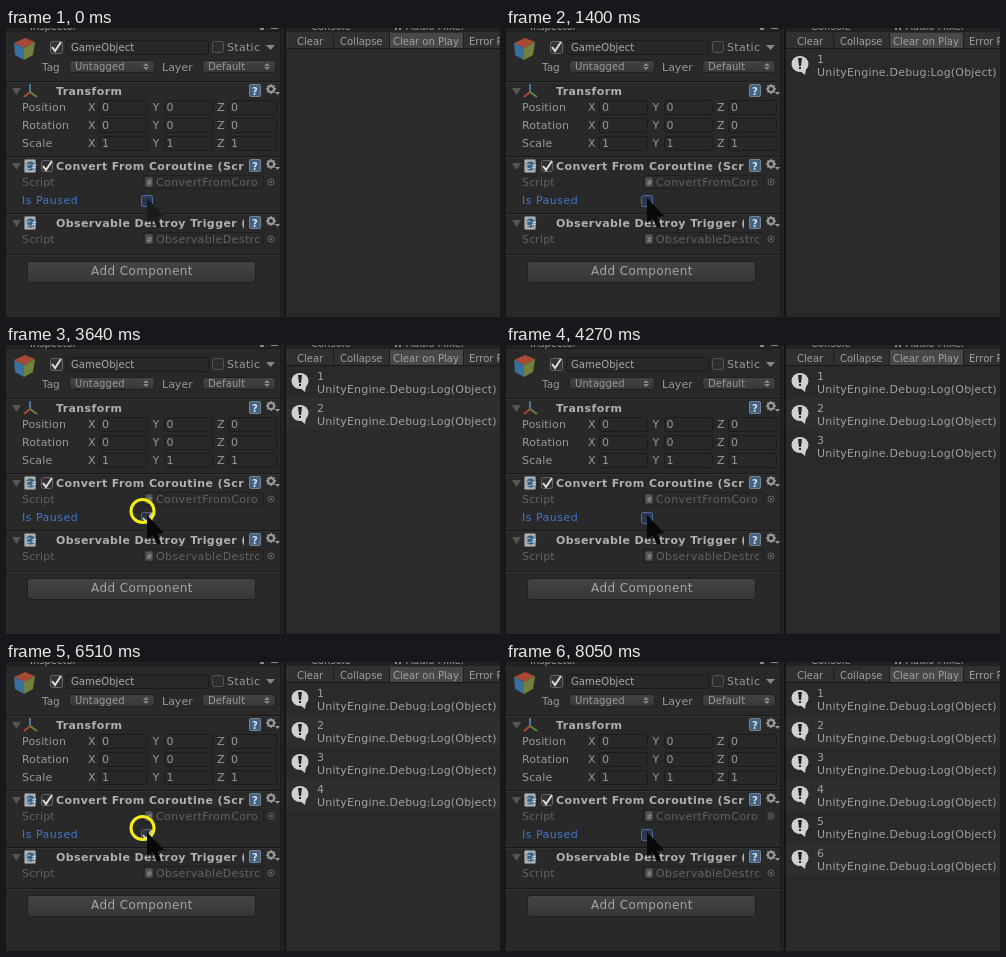
An HTML page with a canvas for the animation above (8.12 s loop, 494x289 px).

```html
<!DOCTYPE html>
<html>
<head>
<meta charset="utf-8">
<style>
html, body { margin: 0; width: 494px; height: 289px; overflow: hidden; background: #292929; }
canvas { display: block; }
</style>
</head>
<body>
<canvas id="stage" width="494" height="289"></canvas>
<script>
const c = document.getElementById('stage').getContext('2d');
const LOOP = 8120;
const LOGS = [840, 1750, 3920, 4900, 6860, 7840];
const CLICKS = [2450, 3640, 5250, 6510];
const RING_TIME = 210, PRESS_TIME = 70;
const FONT = '"DejaVu Sans", Verdana, sans-serif';

function rect(x, y, w, h, fill) {
  c.fillStyle = fill;
  c.fillRect(x, y, w, h);
}

function box(x, y, w, h, fill, stroke, r = 2) {
  c.beginPath();
  c.roundRect(x + .5, y + .5, w - 1, h - 1, r);
  c.fillStyle = fill;
  c.fill();
  c.strokeStyle = stroke;
  c.lineWidth = 1;
  c.stroke();
}

function button(x, y, w, h) {
  const g = c.createLinearGradient(0, y, 0, y + h);
  g.addColorStop(0, '#444');
  g.addColorStop(1, '#363636');
  box(x, y, w, h, g, '#1f1f1f', 3);
}

function text(s, x, y, { color = '#999', size = 11, gap = .15, bold = false, max = 0 } = {}) {
  c.save();
  if (max) {
    c.beginPath();
    c.rect(x, y - 14, max - x, 20);
    c.clip();
  }
  c.font = `${bold ? 'bold ' : ''}${size}px ${FONT}`;
  c.letterSpacing = gap + 'px';
  c.fillStyle = color;
  c.fillText(s, x, y);
  c.restore();
}

function poly(points, fill) {
  c.beginPath();
  points.forEach(([x, y]) => c.lineTo(x, y));
  c.closePath();
  c.fillStyle = fill;
  c.fill();
}

function line(points, color, width = 1) {
  c.beginPath();
  points.forEach(([x, y]) => c.lineTo(x, y));
  c.strokeStyle = color;
  c.lineWidth = width;
  c.stroke();
}

function circle(x, y, r, color, width) {
  c.beginPath();
  c.arc(x, y, r, 0, 7);
  c.lineWidth = width;
  c.strokeStyle = color;
  c.stroke();
}

function check(x, y, color) {
  line([[x + 2, y + 5], [x + 5, y + 9], [x + 11, y]], color, 2);
}

function gear(x, y) {
  circle(x, y, 3, '#999', 2);
  for (let i = 0; i < 8; i++) {
    const a = i * Math.PI / 4, dx = Math.cos(a), dy = Math.sin(a);
    line([[x + dx * 3, y + dy * 3], [x + dx * 5, y + dy * 5]], '#999', 1.5);
  }
  poly([[x + 4, y + 3], [x + 9, y + 3], [x + 6.5, y + 6]], '#999');
}

function help(x, y) {
  box(x, y, 12, 13, '#3f6285', '#77858f', 1);
  text('?', x + 3, y + 10.5, { color: '#ddd', size: 10, bold: true, gap: 0 });
}

function heading(title, y) {
  poly([[6, y - 3], [15, y - 3], [10.5, y + 4]], '#555');
  text(title, 50, y + 4, { color: '#b0b0b0', bold: true, gap: .4, max: 238 });
  help(243, y - 7);
  gear(265, y - 2);
}

function scriptIcon(x, y) {
  box(x, y, 12, 14, '#aab2b6', '#777', 1);
  c.fillStyle = '#376285';
  c.beginPath();
  c.arc(x + 6.5, y + 7, 4.5, 0, 7);
  c.fill();
  text('C#', x + 2, y + 9.5, { color: '#eee', size: 7, gap: 0 });
}

function scriptRow(name, y) {
  text('Script', 16, y + 4, { color: '#626262' });
  box(137, y - 7, 121, 14, '#292929', '#202020');
  box(139, y - 5, 8, 10, '#555', '#444', 1);
  text('#', 140.5, y + 3, { color: '#999', size: 7, gap: 0 });
  text(name, 150, y + 4, { color: '#626262', gap: .4, max: 253 });
  circle(265, y, 3, '#666', 1);
  rect(264, y - 1, 2, 2, '#666');
}

function popup(label, x, w) {
  button(x, 32, w, 13);
  text(label, x + 6, 42, { size: 10, gap: .1 });
  const mid = x + w - 9;
  poly([[mid - 3, 38], [mid + 3, 38], [mid, 35]], '#888');
  poly([[mid - 3, 39], [mid + 3, 39], [mid, 42]], '#888');
}

function header() {
  rect(0, 0, 274, 4, '#222');
  rect(0, 3, 274, 1, '#1c1c1c');
  text('Inspector', 24, 1.5, { size: 10, gap: 0 });
  rect(254, 0, 4, 2, '#888');
  rect(265, 0, 7, 1, '#888');

  poly([[8, 15], [19, 10], [29, 14], [18, 20]], '#a84a35');
  poly([[8, 15], [18, 20], [18, 32], [9, 27]], '#38719f');
  poly([[18, 20], [29, 14], [27, 27], [18, 32]], '#71813b');

  box(44, 13, 13, 13, '#333', '#666');
  check(44, 14, '#ddd');
  box(60, 12, 143, 15, '#282828', '#1b1b1b');
  text('GameObject', 65, 23, { color: '#aaa', size: 10, gap: .1 });
  box(206, 13, 12, 12, '#2d2d2d', '#555');
  text('Static', 221, 23, { gap: .3 });
  poly([[260, 17], [269, 17], [264.5, 22]], '#888');
  text('Tag', 36, 43, { size: 10.5, gap: 0 });
  popup('Untagged', 63, 86);
  text('Layer', 156, 43, { gap: 0 });
  popup('Default', 196, 74);
}

function transform() {
  line([[24, 64], [24, 56]], '#46779c', 2);
  line([[24, 64], [18, 69]], '#a84a35', 2);
  line([[24, 64], [31, 69]], '#71813b', 2);
  heading('Transform', 63);
  ['Position', 'Rotation', 'Scale'].forEach((name, row) => {
    const y = 79 + row * 18;
    text(name, 16, y + 4);
    ['X', 'Y', 'Z'].forEach((axis, i) => {
      const x = 93 + i * 64.5;
      text(axis, x - 11, y + 4);
      box(Math.round(x), y - 7, 49, 15, '#282828', '#1b1b1b');
      text(row == 2 ? '1' : '0', x + 3, y + 4);
    });
  });
}

function pauseToggle(t) {
  const clicks = CLICKS.filter(at => t >= at + PRESS_TIME).length;
  const pressed = CLICKS.some(at => t >= at && t < at + PRESS_TIME);
  text('Is Paused', 16, 176, { color: '#3e78d0', gap: .5 });
  box(135, 167, 12, 12, pressed ? '#30343c' : '#29384f', pressed ? '#596170' : '#4d6ea5');
  if (clicks % 2) check(135, 168, '#b5c6df');
}

function inspector(t) {
  rect(0, 0, 280, 289, '#292929');
  header();
  for (const y of [53, 128, 185, 226]) {
    rect(0, y, 274, 1, '#171717');
    rect(0, y + 1, 274, 1, '#343434');
  }
  transform();

  scriptIcon(18, 131);
  box(35, 132, 12, 12, '#303030', '#666');
  check(35, 133, '#ddd');
  heading('Convert From Coroutine (Script)', 138);
  scriptRow('ConvertFromCoroutine', 154);
  pauseToggle(t);

  scriptIcon(18, 188);
  heading('Observable Destroy Trigger (Script)', 195);
  scriptRow('ObservableDestroyTrigger', 211);

  button(21, 233, 229, 22);
  text('Add Component', 85, 247, { size: 12, gap: .4, color: '#a5a5a5' });
  rect(274, 0, 1, 289, '#1c1c1c');
  rect(275, 0, 3, 289, '#222');
  rect(278, 0, 2, 289, '#151515');
}

function logRow(i) {
  const y = 21 + i * 32;
  rect(280, y, 214, 32, i % 2 ? '#2e2e2e' : '#2a2a2a');
  c.fillStyle = '#d0d0d0';
  c.beginPath();
  c.ellipse(294, y + 15, 8.5, 8, 0, 0, 7);
  c.fill();
  poly([[293, y + 21], [300, y + 20], [299, y + 26]], '#d0d0d0');
  poly([[292, y + 9], [296, y + 9], [295, y + 17], [293, y + 17]], '#222');
  rect(293, y + 18, 2, 2, '#222');
  text(String(i + 1), 311, y + 14, { color: '#a0a0a0' });
  text('UnityEngine.Debug:Log(Object)', 311, y + 27, { color: '#a0a0a0', gap: .2 });
}

function consolePanel(t) {
  rect(280, 0, 214, 289, '#2a2a2a');
  rect(280, 0, 214, 4, '#222');
  text('Console', 305, 1.5, { size: 10, gap: 0 });
  text('Audio Mixer', 400, 1.5, { size: 10, gap: 0 });
  rect(389, 0, 2, 2, '#888');
  rect(393, 0, 2, 2, '#888');
  rect(280, 4, 214, 16, '#303030');
  rect(384, 5, 73, 15, '#484848');
  for (const x of [327, 383, 457]) rect(x, 5, 1, 15, '#1d1d1d');
  rect(280, 20, 214, 1, '#181818');
  const label = { size: 10, gap: 0, color: '#a0a0a0' };
  text('Clear', 291, 17, label);
  text('Collapse', 334, 17, label);
  text('Clear on Play', 387, 17, label);
  text('Error Pause', 463, 17, label);
  LOGS.forEach((at, i) => { if (t >= at) logRow(i); });
}

function pointer(t) {
  if (CLICKS.some(at => t >= at && t < at + RING_TIME)) circle(136.5, 166, 11.5, '#f5ee12', 3);
  poly([[141, 170], [141, 195], [147, 190], [151, 200], [155, 198], [151, 189], [158, 188]],
    t < 70 ? '#1b1b1b' : '#080808');
}

function draw(now) {
  const t = now % LOOP;
  inspector(t);
  consolePanel(t);
  pointer(t);
  requestAnimationFrame(draw);
}
draw(performance.now());
</script>
</body>
</html>
```
